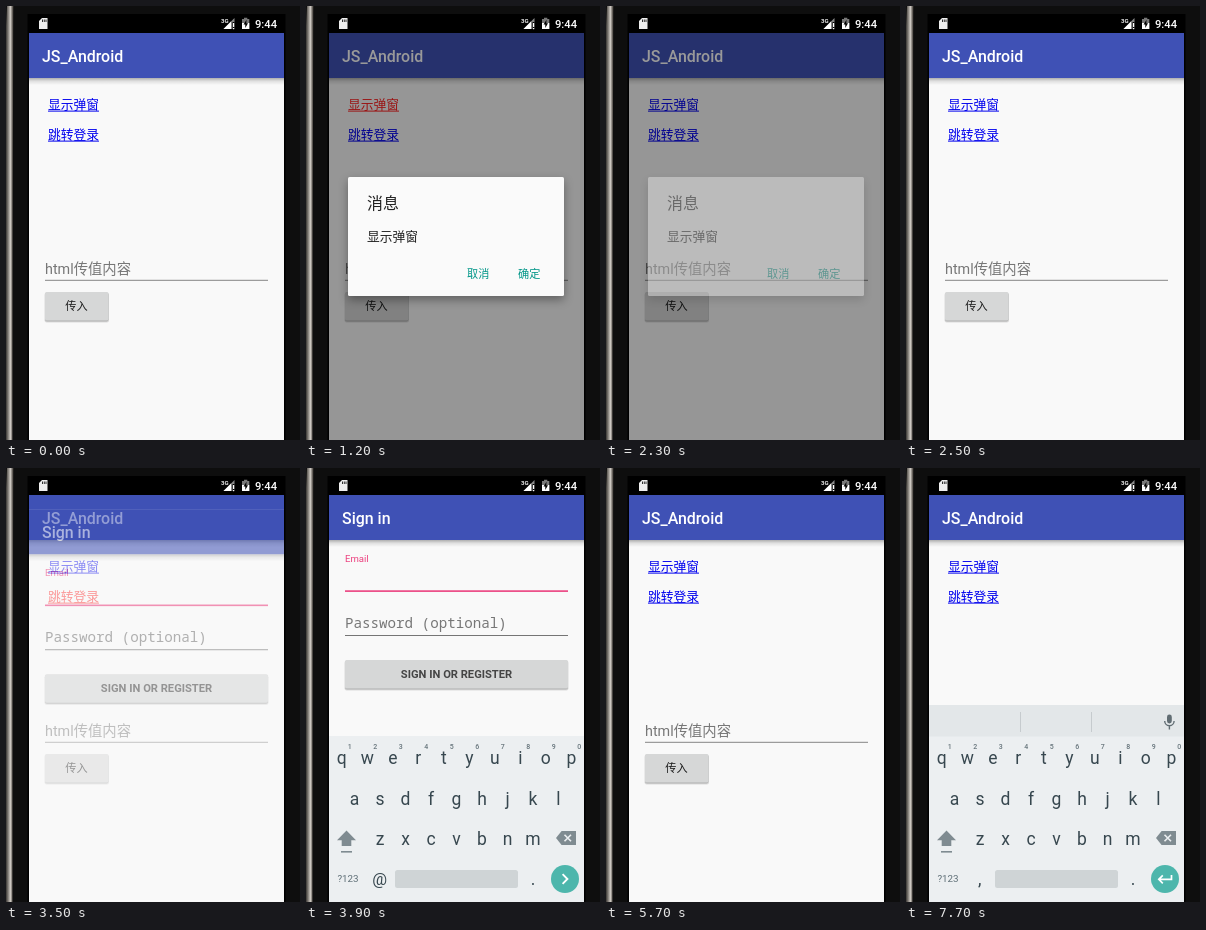
Animation, 294 px wide and 434 px high, one loop 8000 ms. Source, as an HTML page:

```html
<!DOCTYPE html>
<html lang="zh">
<head>
<meta charset="utf-8">
<title>JS_Android</title>
<style>
html, body { margin: 0; width: 100%; height: 100%; overflow: hidden; background: #0e0e0e; }
svg { display: block; width: 100vw; height: 100vh; }
text { font-family: Roboto, 'Noto Sans CJK SC', 'Noto Sans CJK', sans-serif; white-space: pre; }
.mono { font-family: 'Noto Sans Mono', 'DejaVu Sans Mono', monospace; }
#dialog > rect { filter: drop-shadow(0 4px 5px rgba(0, 0, 0, .35)); }
</style>
</head>
<body>
<svg id="stage" viewBox="0 0 294 434"></svg>
<script>
const LOOP = 8000, STEP = 100;
const PAPER = '#f9f9f9', INDIGO = '#3f51b5', PINK = '#ec407f', GREY = '#777';
const INK = '#37474f', KEY_ICON = '#7f8b91', KEYS_BG = '#eceff1', TEAL = '#4db6ac';
const stage = document.getElementById('stage');

// Markup helpers
const attrs = o => Object.entries(o).map(([k, v]) => ` ${k}="${v}"`).join('');
const rect = (x, y, width, height, fill, more = {}) =>
  `<rect${attrs({ x, y, width, height, fill, ...more })}/>`;
const text = (s, x, y, size, fill, more = {}) =>
  `<text${attrs({ x, y, 'font-size': size, fill, ...more })}>${s}</text>`;
const mid = (s, x, y, size, fill, more = {}) =>
  text(s, x, y, size, fill, { 'text-anchor': 'middle', ...more });
const path = (d, fill, more = {}) => `<path${attrs({ d, fill, ...more })}/>`;
const line = (d, stroke, width) => path(d, 'none', { stroke, 'stroke-width': width });
const group = (id, body) => `<g id="${id}">${body}</g>`;

const header = title =>
  rect(23, 72, 255, 7, 'url(#shade)') + rect(23, 27, 255, 45, INDIGO) +
  text(title, 36, 55.5, 15.94, '#fff', { 'font-weight': 500 });

const button = (x, y, w, h) =>
  rect(x - .5, y + 1, w + 1, h + 1, '#000', { rx: 2, opacity: .12 }) +
  rect(x, y + .5, w, h + .5, '#000', { rx: 2, opacity: .2 }) +
  rect(x, y, w, h, '#d6d7d7', { rx: 1.6 });

const link = (id, s, y) =>
  group(id, text(s, 42, y, 12.75, 'inherit') + `<rect x="42" y="${y + 1.2}" width="51" height="1"/>`)
    .replace('fill="inherit"', '');

function statusBar() {
  return rect(23, 8, 255, 19, '#000') +
    path('M36 12H41.5V23H33V15Z', '#eee') +
    line('M36.5 13.5V16M38.3 13.5V16M40 13.5V16', '#000', .8) +
    text('3G', 215, 16.6, 6, '#eee', { 'font-weight': 700 }) +
    path('M228.5 12V23H217.5Z', '#8a8a8a') + path('M225 15.5V23H217.5Z', '#fff') +
    rect(226.5, 16, 2, 8, '#000') + rect(227, 17, 1.2, 4, '#fff') + rect(227, 22, 1.2, 1.2, '#fff') +
    path('M236 13H238V11.7H241.3V13H243.3V23H236Z', '#777') +
    rect(236, 17, 7.3, 6, '#fff') +
    path('M240.5 13.8L237.5 18.4H239.3V22L242 17.2H240.3Z', '#000') +
    text('9:44', 249, 21.7, 11.2, '#fff', { 'font-weight': 500 });
}

function mainPage() {
  return rect(23, 27, 255, 407, PAPER) + header('JS_Android') +
    link('link1', '显示弹窗', 103.4) + link('link2', '跳转登录', 133.4) +
    text('html传值内容', 39, 268, 14.35, GREY) +
    group('plainLine', rect(39, 273.8, 223, 1, '#858585')) +
    group('focusLine', rect(39, 273.8, 223, 1.8, PINK)) +
    group('mainCaret', rect(39, 252, 1.6, 20, PINK)) +
    button(39, 286, 63.5, 28.5) +
    text('传入', 59.3, 304.3, 11.2, '#1c1c1c', { 'font-weight': 500 });
}

function dialog() {
  return rect(42, 171, 216, 119, '#fafafa', { rx: 1.6 }) +
    text('消息', 61, 202.6, 15.94, '#212121') +
    text('显示弹窗', 61, 235.4, 12.75, '#212121') +
    text('取消', 161, 272.3, 11.16, '#009688', { 'font-weight': 500 }) +
    text('确定', 212, 272.3, 11.16, '#009688', { 'font-weight': 500 });
}

function loginPage() {
  return rect(23, 27, 255, 407, PAPER) + header('Sign in') +
    text('Email', 39, 93.6, 9.56, PINK) +
    rect(39, 122.3, 223, 1.6, PINK) +
    group('loginCaret', rect(39, 101, 1.6, 20, PINK)) +
    text('Password (optional)', 39, 160, 14.2, GREY, { class: 'mono' }) +
    rect(39, 167, 223, 1, '#757575') +
    button(39, 192, 223, 28.5) +
    mid('SIGN IN OR REGISTER', 150.5, 210.2, 11.16, '#454545', { 'font-weight': 700 });
}

function keyboard() {
  const row = (keys, x, y) =>
    [...keys].map((k, i) => mid(k, x + i * 25.5, y, 17.5, INK)).join('');
  const digits = [...'1234567890'].map((d, i) =>
    mid(d, 43.8 + i * 25.5, 280.6, 7, '#66747b', { 'font-weight': 500 })).join('');
  return rect(23, 268, 255, 166, KEYS_BG) + digits +
    row('qwertyuiop', 35.8, 295.8) + row('asdfghjkl', 48.5, 336.5) + row('zxcvbnm', 74, 376.8) +
    path('M40.5 362.5L50 372.3H45.3V378H35.7V372.3H31Z', KEY_ICON) +
    rect(35, 383, 11, 1.6, KEY_ICON) +
    path('M250 370L255.6 363H270V377H255.6Z', KEY_ICON) +
    line('M258.5 366.7L265 373.3M265 366.7L258.5 373.3', KEYS_BG, 1.6) +
    mid('?123', 42, 414.3, 9.8, '#5f6f77') +
    group('at', mid('@', 73.7, 416.5, 16.5, INK)) +
    group('comma', mid(',', 73.7, 416.5, 17.5, INK)) +
    rect(89, 402, 123, 18, '#cfd4d6', { rx: 2.5 }) +
    mid('.', 227, 416.5, 17.5, INK) +
    `<circle cx="259" cy="411" r="14" fill="${TEAL}"/>` +
    group('next', line('M256.6 406.2L261.4 411L256.6 415.8', '#fff', 1.9)) +
    group('enter', line('M265.5 407V411.3H253M256.8 407.3L252.8 411.3L256.8 415.3', '#fff', 1.7)) +
    group('strip', rect(23, 237, 255, 31.5, '#e3e7e9') +
      rect(114, 244, 1, 20, '#c6cbce') + rect(185, 244, 1, 20, '#c6cbce') +
      rect(261, 246.5, 4.8, 9, '#616d73', { rx: 2.4 }) +
      line('M258.7 253A4.7 4.7 0 0 0 268.1 253M263.4 257.7V261.5', '#616d73', 1.4));
}

stage.innerHTML =
  `<defs>
    <linearGradient id="shade" x2="0" y2="1">
      <stop stop-opacity=".3"/><stop offset=".45" stop-opacity=".1"/><stop offset="1" stop-opacity="0"/>
    </linearGradient>
    <linearGradient id="rim">
      <stop stop-color="#3a3734"/><stop offset=".3" stop-color="#8a8580"/>
      <stop offset=".55" stop-color="#d2cdc6"/><stop offset=".8" stop-color="#6a655f"/>
      <stop offset="1" stop-color="#000"/>
    </linearGradient>
    <clipPath id="screen"><rect x="23" y="27" width="255" height="407"/></clipPath>
  </defs>` +
  rect(0, 0, 294, 434, '#0e0e0e') +
  path('M1 0H8Q6.5 60 6.5 434H0V20Z', 'url(#rim)') +
  rect(21.5, 8, 258, 426, '#000') + statusBar() +
  `<g clip-path="url(#screen)">` +
  group('main', mainPage()) +
  group('dim', rect(23, 27, 255, 407, '#000')) +
  group('dialog', dialog()) +
  group('login', loginPage()) +
  group('keys', keyboard()) + '</g>';

const el = Object.fromEntries([...stage.querySelectorAll('g[id]')].map(g => [g.id, g]));

// Motion helpers
const within = (t, a, b) => t >= a && t < b;
const ramp = (t, a, b) => Math.min(1, Math.max(0, (t - a) / (b - a)));
const easeOut = p => 1 - (1 - p) ** 2;
const fade = (g, a) => {
  g.setAttribute('opacity', a);
  g.style.display = a > 0 ? '' : 'none';
};
const slideFade = (g, p, distance) => {
  fade(g, p);
  g.setAttribute('transform', `translate(0 ${(1 - p) * distance})`);
};

function draw(time) {
  const t = Math.floor(time / STEP) * STEP;
  el.link1.setAttribute('fill', within(t, 900, 1300) ? '#f22' : '#00e');
  el.link2.setAttribute('fill', within(t, 3300, 3600) ? '#f22' : '#00e');

  const closing = ramp(t, 2200, 2500);
  fade(el.dim, t < 2200 ? .6 * ramp(t, 1000, 1300) : .6 * (1 - closing));
  fade(el.dialog, t < 2200 ? ramp(t, 1000, 1200) : (1 - closing) ** 2.4);

  const login = t < 5500 ? easeOut(ramp(t, 3400, 3700)) : 1 - ramp(t, 5500, 5700);
  slideFade(el.login, login, 32);
  fade(el.loginCaret, +(within(t, 4400, 4900) || within(t, 5300, 5700)));

  const focused = t >= 7400;
  fade(el.plainLine, +!focused);
  fade(el.focusLine, +focused);
  fade(el.mainCaret, +within(t, 7400, 7900));

  const keys = focused ? easeOut(ramp(t, 7500, 7700))
    : t < 4500 ? easeOut(ramp(t, 3600, 3900)) : 1 - ramp(t, 4500, 4900);
  slideFade(el.keys, keys, 17);
  for (const id of ['strip', 'comma', 'enter']) fade(el[id], +focused);
  for (const id of ['at', 'next']) fade(el[id], +!focused);
}

const start = performance.now();
function tick() {
  draw((performance.now() - start) % LOOP);
  requestAnimationFrame(tick);
}
tick();
</script>
</body>
</html>
```
